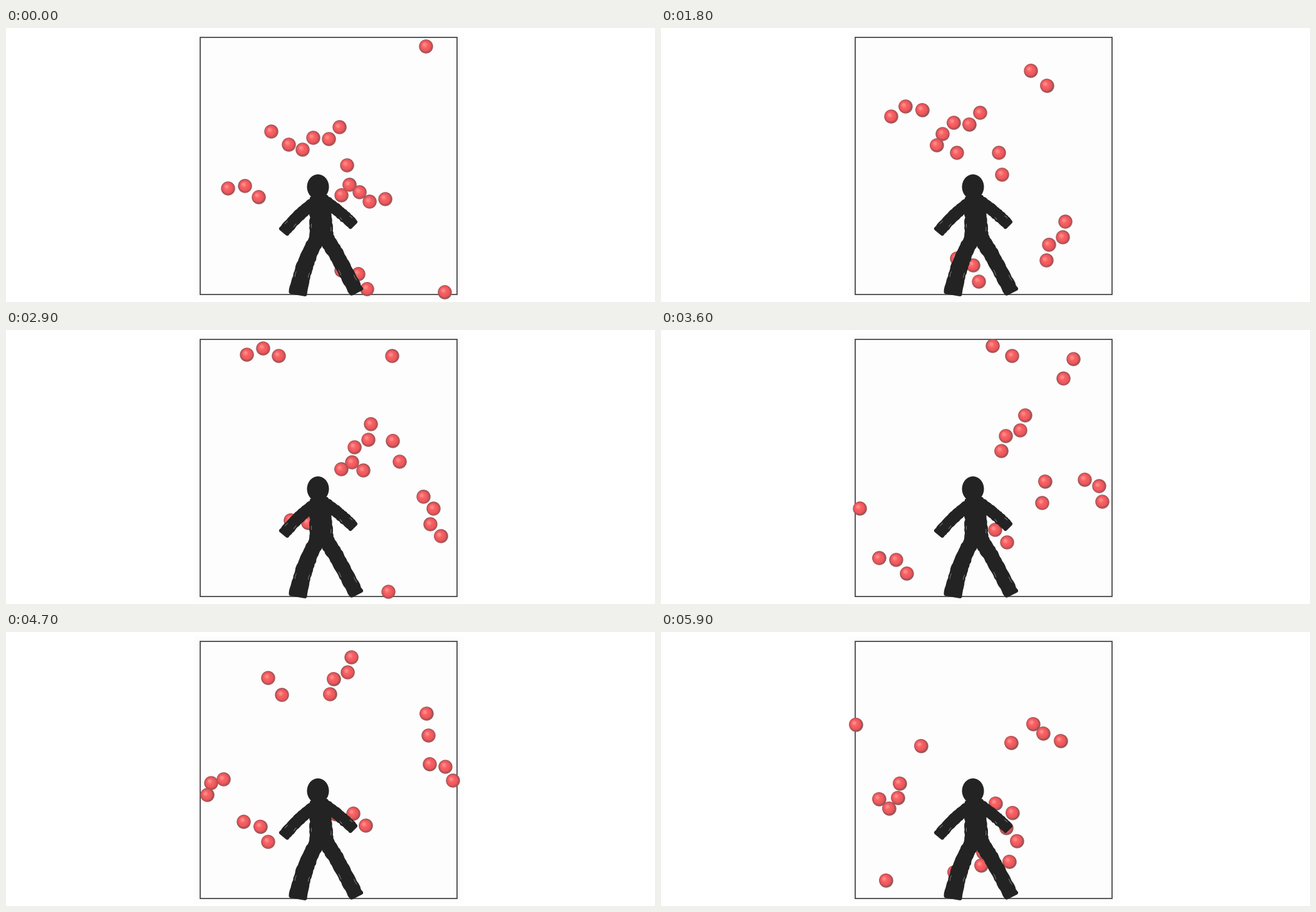
A matplotlib script that plays this animation: 1036 px wide and 438 px high, repeating every 9100 ms.

```python
import matplotlib.pyplot as plt
import numpy as np
from matplotlib.animation import FuncAnimation
from matplotlib.colors import LinearSegmentedColormap
from matplotlib.patches import Ellipse, Polygon, Rectangle

W, H, DPI = 1036, 438, 100
PX = 72 / DPI                      # one pixel in points
ORIGIN = np.array([310.0, 15.0])   # upper left corner of the periodic cell
CELL = np.array([410.0, 411.0])
FRAMES, INTERVAL = 91, 100
STOPS = [0, 10, 18, 29, 36, 47, 59]   # the balls rest after the last stop
STEPS = np.arange(STOPS[-1] + 1)
INK = "#232323"

rng = np.random.default_rng(4)


def wrap(d):
    """Shortest displacement in the periodic cell."""
    return (d + CELL / 2) % CELL - CELL / 2


def cluster(path, rest):
    """Tumbling chain that drifts along path, then loosens to its rest places."""
    rest = np.array(rest, float)
    n, home = len(rest), rest.mean(0)
    stops = np.vstack([path, home])
    stops[1:] = stops[0] + wrap(np.diff(stops, axis=0)).cumsum(0)
    centre = np.column_stack([np.interp(STEPS, STOPS, c) for c in stops.T])

    k = np.arange(n)
    bond = 19 * (1 + 3 / n ** 2)   # small clusters are looser
    chain = bond * (k - (n - 1) / 2) + 5.5j * (-1.0) ** k
    angle = rng.uniform(0, 2 * np.pi) + rng.normal(0, 0.15, len(STEPS)).cumsum()
    spun = np.exp(1j * angle)[:, None] * chain
    shape = np.stack([spun.real, spun.imag], axis=-1)
    shape += rng.normal(0, 1.5, (len(STEPS), 1, 2))

    t = np.clip((STEPS - STOPS[-2]) / (STOPS[-1] - STOPS[-2]), 0, 1)
    ease = (t * t * (3 - 2 * t))[:, None, None]
    return centre[:, None] + (1 - ease) * shape + ease * (rest - home)


def separate(p, gap=20.5):
    """Push overlapping balls apart."""
    for _ in range(8):
        d = wrap(p[:, None] - p[None])
        r = np.hypot(d[..., 0], d[..., 1])
        np.fill_diagonal(r, gap)
        push = np.clip(gap - r, 0, None) / np.maximum(r, 1) / 2
        p = p + (d * push[..., None]).sum(1)
    return p


clusters = [
    cluster([(502, 175), (491, 153), (478, 152), (570, 179), (561, 164), (534, 70)],
            [(594, 147), (559, 177), (534, 274), (561, 289)]),
    cluster([(436, 175), (442, 160), (455, 195), (554, 225), (545, 35), (430, 87)],
            [(415, 182), (503, 305)]),
    cluster([(571, 271), (593, 264), (632, 340), (682, 299), (702, 262), (704, 225)],
            [(381, 242), (378, 265), (348, 267), (364, 282)]),
    cluster([(379, 257), (398, 137), (392, 130), (412, 34), (376, 372), (404, 316)],
            [(468, 384), (511, 373), (514, 352)]),
    cluster([(560, 400), (573, 400), (493, 382), (478, 310), (530, 325), (554, 296)],
            [(551, 313), (568, 334), (556, 367)]),
    cluster([(545, 236), (612, 242), (544, 218), (627, 195), (610, 260), (673, 148)],
            [(610, 162), (638, 174)]),
    cluster([(689, 19), (610, 175), (604, 81), (617, 23), (649, 63), (332, 250)],
            [(311, 148), (359, 397)]),
]
track = [ORIGIN + (separate(p) - ORIGIN) % CELL - 0.5
         for p in np.concatenate(clusters, axis=1)]

fig = plt.figure(figsize=(W / DPI, H / DPI), dpi=DPI, facecolor="white")
ax = fig.add_axes([0, 0, 1, 1])
ax.set(xlim=(0, W), ylim=(H, 0))
ax.axis("off")

ax.add_patch(Rectangle((300, 6), 432, 428, fc="#fdfdfd", ec="none", zorder=0))
ax.add_patch(Rectangle(ORIGIN, *CELL, fill=False, ec="#484848",
                       lw=1.8 * PX, zorder=1))

# shaded balls: nested discs sliding towards the highlight
shade = LinearSegmentedColormap.from_list(
    "ball", [(0, "#94585a"), (0.12, "#c44e52"), (0.3, "#ec575b"),
             (0.7, "#f96265"), (1, "#fd8a8a")])
balls = []
for u in np.linspace(0, 1, 11):
    dots = ax.scatter(*track[0].T, s=(2 * (11.2 - 9 * u) * PX) ** 2,
                      color=shade(u), linewidths=0, zorder=2 + u)
    balls.append((dots, 2.8 * u))


def brush(a, b, c, w0, w1, soft=6):
    """Rough brush stroke along the curve a-b-c, w0 to w1 pixels wide."""
    t = np.linspace(0, 1, 24)[:, None]
    a, b, c = (np.array(p, float) for p in (a, b, c))
    mid = (1 - t) ** 2 * a + 2 * t * (1 - t) * b + t ** 2 * c
    way = 2 * (1 - t) * (b - a) + 2 * t * (c - b)
    normal = way[:, ::-1] * (-1, 1) / np.hypot(*way.T)[:, None]
    half = (w0 + (w1 - w0) * t - soft) / 2
    rough = rng.normal(0, 0.4, (2, len(t), 1))
    left, right = (mid + s * normal * (half + r) for s, r in zip((1, -1), rough))
    ax.add_patch(Polygon(np.vstack([left, right[::-1]]), fc=INK, ec=INK,
                         lw=soft * PX, joinstyle="round", zorder=5))
    # paper showing through near the tip
    for side in (left, right):
        i = rng.integers(14, 20)
        ax.plot(*side[i:i + 3].T, color="#b0b0b0", lw=0.6 * PX, zorder=6)


ax.add_patch(Ellipse((498, 254), 35, 40, fc=INK, ec="none", zorder=5))
brush((500, 271), (503, 300), (503.5, 338), 31, 39)    # torso
brush((491, 281), (468, 296), (444, 325), 20, 19)      # arms
brush((511, 279), (532, 292), (554, 314), 20, 18)
brush((496, 338), (474, 377), (466, 424), 24, 29)      # legs
brush((511, 336), (532, 368), (559, 421), 25, 23)


def draw(i):
    p = track[min(i, len(track) - 1)]
    for dots, shift in balls:
        dots.set_offsets(p - shift)
    return [dots for dots, _ in balls]


anim = FuncAnimation(fig, draw, frames=FRAMES, interval=INTERVAL,
                     repeat=True, repeat_delay=0)
plt.show()
```
